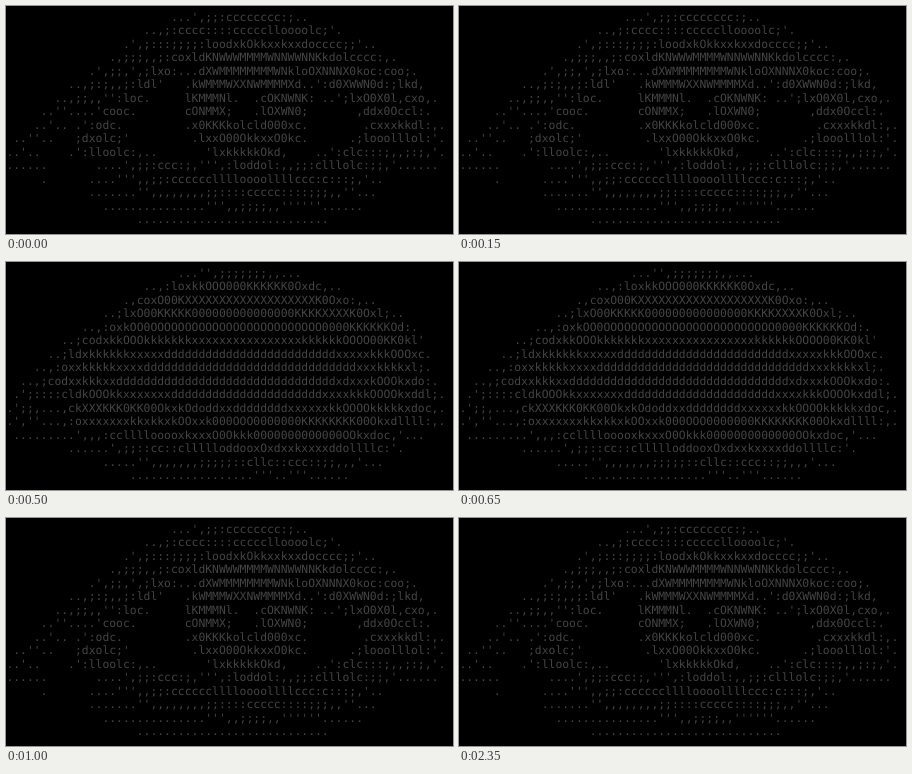
Write an HTML page that moves like this. It is 447 px wide and 228 px high and loops after 3.25 s.

```html
<!DOCTYPE html>
<html lang="en">
<head>
<meta charset="utf-8">
<title>Blinking eye</title>
<style>
  html, body {
    margin: 0;
    width: 100%;
    height: 100%;
    overflow: hidden;
    background: #000;
  }
  pre {
    position: absolute;
    left: 0.4px;
    top: 4.8px;
    margin: 0;
    color: #444;
    font: 11.4px/13.48px "DejaVu Sans Mono", monospace;
    font-variant-ligatures: none;
    text-rendering: geometricPrecision;
    visibility: hidden;
    animation: 3250ms step-end infinite;
  }
  .open { animation-name: open; }
  .half { animation-name: half; }
  .shut { animation-name: shut; }

  /* 250 ms steps: open, half, shut, half, then open for the rest */
  @keyframes open {
    0% { visibility: visible; }
    7.6923% { visibility: hidden; }
    30.7692%, 100% { visibility: visible; }
  }
  @keyframes half {
    0% { visibility: hidden; }
    7.6923% { visibility: visible; }
    15.3846% { visibility: hidden; }
    23.0769% { visibility: visible; }
    30.7692%, 100% { visibility: hidden; }
  }
  @keyframes shut {
    0% { visibility: hidden; }
    15.3846% { visibility: visible; }
    23.0769%, 100% { visibility: hidden; }
  }
</style>
</head>
<body>
<pre class="open">
                        ...',;;:cccccccc:;..
                    ..,;:cccc::::ccccclloooolc;'.
                 .',;:::;;;;:loodxkOkkxxkxxdocccc;;'..
               .,;;;,,;:coxldKNWWWMMMMWNNWWNNKkdolcccc:,.
            .',;;,',;lxo:...dXWMMMMMMMMWNkloOXNNNX0koc:coo;.
         ..,;:;,,;:ldl'   .kWMMMWXXNWMMMMXd..':d0XWWN0d:;lkd,
       ..,;;,,'':loc.     lKMMMNl.  .cOKNWNK: ..';lxO0X0l,cxo,.
     ..''....'cooc.       cONMMX;   .lOXWN0;       ,ddx0Occl:.
    ..'.. .':odc.         .x0KKKkolcld000xc.        .cxxxkkdl:,.
 ..''..   ;dxolc;'         .lxxO00OkkxxO0kc.      .;looolllol:'.
..'..    .':lloolc:,..       'lxkkkkkOkd,    ..':clc:::;,,;:;,'.
......       ....',;;:ccc:;,''',:loddol:,,;;:clllolc:;;,'......
     .      ....''',,;;:cccccclllloooollllccc:c:::;,'..
            .......'',,,,,,,,;;::::ccccc::::;;;,,''...
              ...............''',,;;;;,,''''''......
                   ............................
</pre>
<pre class="half">
                         ...'',;;;;::;;;,'..
                    ..,;:cloodddxxxkkkkkkkkxol;..
                 .';codxxkkkOOOOOOOOOOOOkkkkkkxdoc,..
               .,codxkOOOO00000000OOOOOOOOOOOOOkkxddoc,..
            .':ldxkOOOOO000000000000000000000OOOOOOkkxxol;'
         .,:ldxkkOOOOOO000K000000000000000K00000000OOkkxkkx:.
      ..,coxkkOOOOOOOOOOOOOOkkOOOOOO000OOOO000000000OOOkxxxxl'
     .,;codxxkkOOO000OOkkk0KK0XNWWWWWWWWWNX0kkkkkOOOOkkxdool;.
   .';::ccldkO0KKKK0Ooc;..,x00KNNXXXXXNNX0OOO0000OOkkkkkkxoc:,..
 ..,;,'..,oO0OOOkkxo,       ,lkKKKKKK0K0d,.;ldkOO0KKOkxxxdoc:'..
..,,'.  .,lkOxxxdol:,..        .,ldddl:,.    .,codkkOOkxdollc:,.
..'.......',;:c::cclccc::;,,,',,;::::;,;;:::clodddxdol;::;'.....
   .....   ...''',,,;;;:cclllooooooooooooooolllcccc:;;,....
            .......'',,,,,,;;;:::ccclllccc:::;;;,''...
              ..............'''',,;;;;;;,,''''......
                   .............................
</pre>
<pre class="shut">
                         ...'',;;;;;;;,,...
                    ..,:loxkkOOO000KKKKKK0Oxdc,..
                 .,coxO00KXXXXXXXXXXXXXXXXXXXK0Oxo:,..
              ..;lxO00KKKKK000000000000000KKKKXXXXK0Oxl;..
           ..,:oxkOO0OOOOOOOOOOOOOOOOOOOOOOOOO0000KKKKKKOd:.
        ..;codxkkOOOkkkkkkkxxxxxxxxxxxxxxxxkkkkkkOOOO00KK0kl'
      ..;ldxkkkkkkxxxxxdddddddddddddddddddddddddxxxxxkkkOOOxc.
    ..,:oxxkkkkkxxxxdddddddddddddddddddddddddddddddxxxkkkkxl;.
  ..,;codxxkkkxxddddddddddddddddddddddddddddddddxdxxxkOOOkxdo:.
 .';::::cldkOOOkkxxxxxxxddddddddddddddddddddddxxxxkkkOOOOkxddl;.
.';;,...,ckXXXKKK0KK00OkxkOdoddxxddddddddxxxxxxkkOOOOkkkkkxdoc,.
.',''...,:oxxxxxxxkkxkkxkOOxxk000OOO0000000KKKKKKKK00Okxdllll:,.
 .........',,,:ccllllooooxkxxxO0Okkk0000000000000OOkxdoc,'...
         ......',;;::cc::cllllloddooxOxdxxkxxxxddollllc:'.
              .....'',,,,,,,;;;;;::cllc::ccc::;;,,,'...
                  ..................'''..'''......
</pre>
</body>
</html>
```
